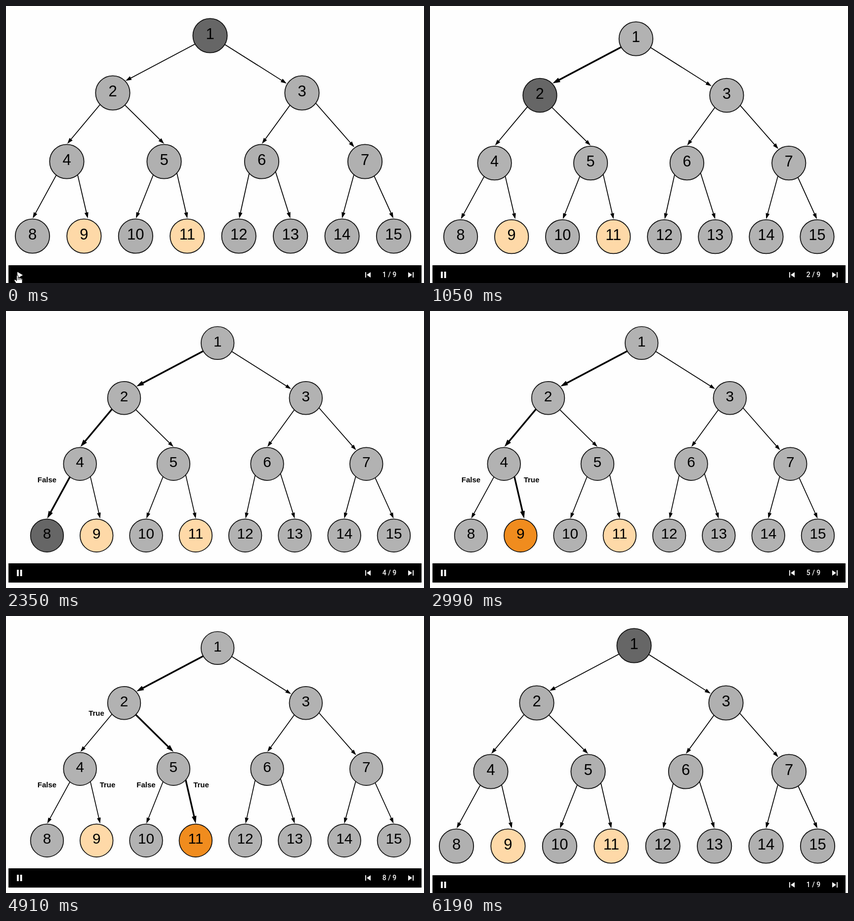
An HTML page that plays this animation: 846 by 561 pixels, repeating every 6270 ms.

```html
<!DOCTYPE html>
<html lang="en">
<head>
<meta charset="utf-8">
<title>Tree search</title>
<style>
  html, body { margin: 0; width: 100%; height: 100%; overflow: hidden; background: #fefefe; }
  svg { display: block; }
  text { text-anchor: middle; }
  .node { font: 31px "Liberation Sans", Arial, sans-serif; }
  .label { font: bold 15px "Liberation Sans", Arial, sans-serif; }
  .page { font: 500 14px Roboto, sans-serif; fill: #fff; }
</style>
</head>
<body>
<svg id="stage" width="846" height="561" viewBox="0 0 846 561"></svg>
<script>
const LOOP = 6270;
const stage = document.getElementById('stage');

// Node centres, numbered from 1
const nodes = [[413, 60], [216, 176], [599, 176], [123, 315], [320, 315], [517.5, 315], [726.5, 315]];
for (let i = 0; i < 8; i++) nodes.push([53.5 + i * 104.43, 466]);

// Edges into nodes 2, 3, ...: start and tip
const edges = [
  [382, 77.5, 242, 151.5], [443, 78, 568, 157],
  [190, 200, 124, 279], [241, 201, 320, 279], [574, 202, 518, 279], [627, 197, 705, 286],
  [102, 342, 54, 430], [145, 342, 165.5, 430], [298, 342, 263, 430], [346, 339, 367, 430],
  [492, 340, 472, 430], [546, 337, 575.5, 430], [704, 342, 680, 430], [745, 344, 784, 430]
];

// Results in the order in which they appear
const labels = [
  ['False', 83, 347], ['True', 205.5, 347], ['True', 183, 202], ['False', 283.5, 347],
  ['True', 395, 347], ['True', 298, 202], ['True', 345, 96]
];

const slides = [
  { at: 0, dark: 1, bold: [] },
  { at: 1050, dark: 2, bold: [2] },
  { at: 1690, dark: 4, bold: [2, 4] },
  { at: 2350, dark: 8, bold: [2, 4, 8], labels: 1 },
  { at: 2990, found: [9], bold: [2, 4, 9], labels: 2 },
  { at: 3630, dark: 5, bold: [2, 5], labels: 3 },
  { at: 4270, dark: 10, bold: [2, 5, 10], labels: 4 },
  { at: 4910, found: [11], bold: [2, 5, 11], labels: 5 },
  { at: 5570, found: [9, 11], bold: [2, 4, 5, 9, 11], labels: 7 }
];

function arrow([x, y, tipX, tipY], bold) {
  const length = Math.hypot(tipX - x, tipY - y);
  const angle = Math.atan2(tipY - y, tipX - x) * 180 / Math.PI;
  const head = bold ? 15.5 : 12, half = bold ? 5 : 4;
  return `<g transform="translate(${x} ${y}) rotate(${angle})">
    <path d="M-3 0H${length - head + 1}" stroke="#000" stroke-width="${bold ? 3.5 : 1.75}"/>
    <path d="M${length} 0l${-head} ${-half}v${2 * half}z"/></g>`;
}

function circle([x, y], id, slide, gray) {
  const goal = id === 9 || id === 11;
  const fill = slide.found?.includes(id) ? '#f08c1e' : slide.dark === id ? '#666' : goal ? '#fed9a8' : gray;
  return `<circle cx="${x}" cy="${y}" r="34.7" fill="${fill}" stroke="#111" stroke-width="1.8"/>
    <text class="node" x="${x}" y="${y + 7}">${id}</text>`;
}

function tree(slide, index) {
  const place = index === 0 ? '' : index < 3
    ? 'translate(9.2 7.2) scale(.987)'
    : 'translate(31.6 7.2) scale(.9603)';
  const gray = index ? '#b2b2b2' : '#b0b0b0';
  return `<g transform="${place}">
    ${edges.map((e, i) => arrow(e, slide.bold.includes(i + 2))).join('')}
    ${nodes.map((n, i) => circle(n, i + 1, slide, gray)).join('')}</g>
    ${labels.slice(0, slide.labels || 0).map(([s, x, y]) => `<text class="label" x="${x}" y="${y}">${s}</text>`).join('')}`;
}

function controls(index, playing) {
  const button = playing ? 'M22 538h3.8v13H22zM28.7 538h3.8v13h-3.8z' : 'M23 538.5L34 545L23 551.5z';
  return `<g transform="translate(0 ${index < 3 ? 0 : -14})">
    <path d="M5 525H841V564H5z"/>
    <path fill="#fff" d="${button}M727 539h1.8v11H727zM738 539v11l-8-5.5zM814 539v11l8-5.5zM823.2 539h1.8v11h-1.8z"/>
    <text class="page" x="776" y="549">${index + 1} / 9</text></g>`;
}

const hand = `<path fill="#fff" stroke="#000" d="M21.5 556.5V546q1.5-2 3 0V550.5q1.6-1.2 3 .5q1.6-1 3 .7q2-.6 2.5 1.3V560L31 564H22L16.7 556q0-2.8 2.8-1.5z"/>
  <path fill="none" stroke="#000" d="M24.5 550v5M27.5 551v4M30.5 552v3"/>`;
const ring = '<circle cx="22" cy="544" r="11" fill="none" stroke="#aaa" stroke-width="1.5"/>';

let shown = '';
function draw(now) {
  const t = now % LOOP;
  const index = t >= 6190 ? 0 : slides.findLastIndex(s => t >= s.at);
  const playing = t >= 390, pressed = t >= 220 && t < 360, pointer = t < 800;
  const state = [index, playing, pressed, pointer].join();
  if (state !== shown) {
    shown = state;
    stage.innerHTML = tree(slides[index], index) + controls(index, playing)
      + (pressed ? ring : '') + (pointer ? hand : '');
  }
  requestAnimationFrame(() => draw(performance.now() - start));
}
const start = performance.now();
draw(0);
</script>
</body>
</html>
```
